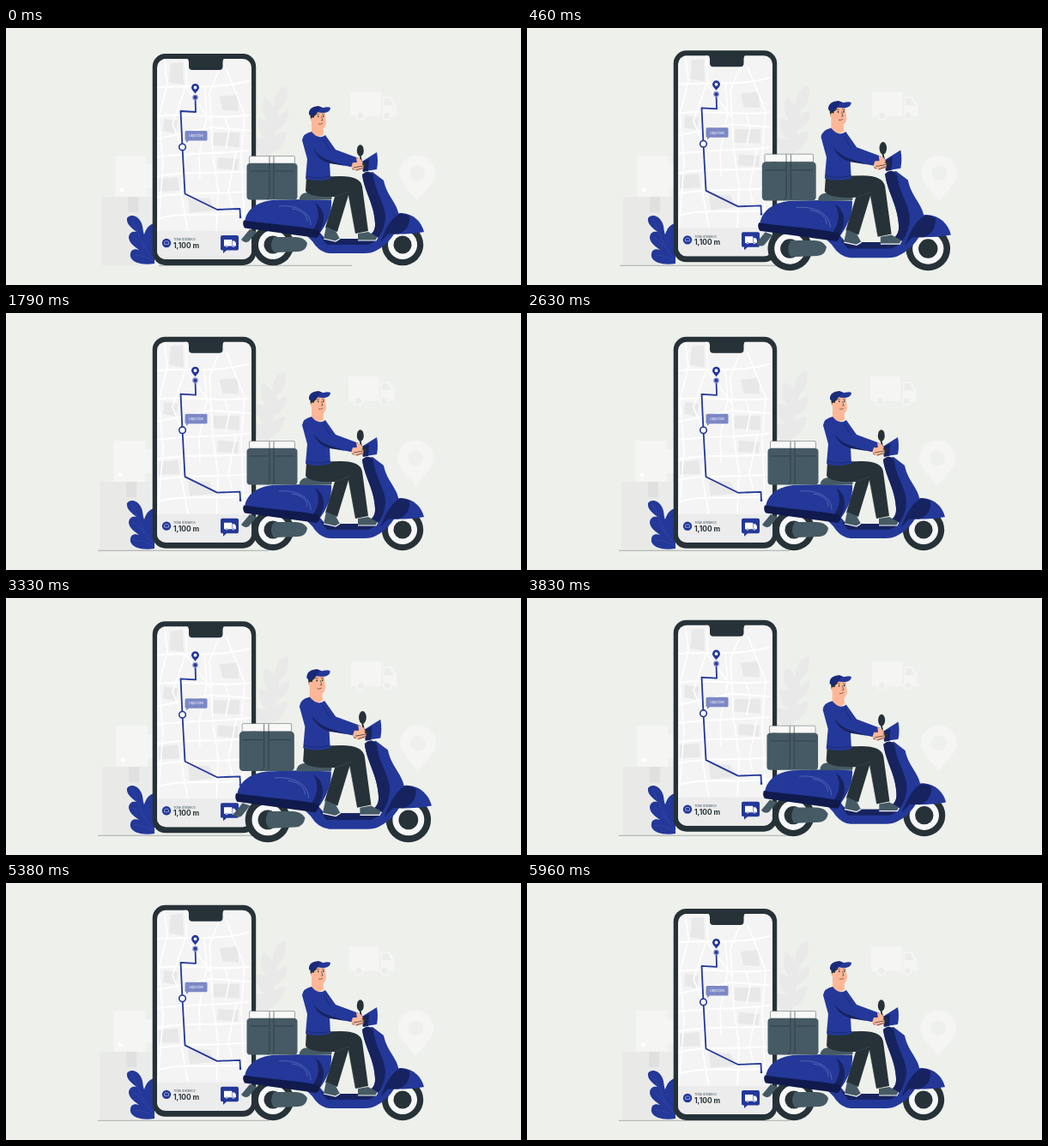
Write an HTML page that moves like this. It is 600 by 300 pixels and loops after 6000 ms.

```html
<!DOCTYPE html>
<html lang="en">
<head>
<meta charset="utf-8">
<title>Delivery</title>
<style>
html, body { margin: 0; width: 100%; height: 100%; overflow: hidden; background: #eef0eb; }
svg { display: block; width: 100vw; height: 100vh; }
text { font-family: Inter, "Open Sans", sans-serif; }
.blue { fill: #233899; }
.navy { fill: #17235f; }
.dark { fill: #263238; }
.grey { fill: #455a64; }
.skin { fill: #fdb797; }
.pale { fill: #f5f5f4; }
.line { fill: none; stroke: #263238; stroke-width: .6; }
.route { fill: none; stroke: #233899; stroke-width: 1.8; stroke-linejoin: round; }
</style>
</head>
<body>
<svg viewBox="0 0 600 300">
  <defs>
    <clipPath id="screen"><rect x="176" y="36" width="110" height="234" rx="10"/></clipPath>
    <g id="wheel">
      <circle class="dark" r="24.200"/>
      <circle r="17" fill="#f7f7f7"/>
      <circle class="dark" r="10.500"/>
    </g>
    <path id="pin" d="M0 33C-4 25-21 13-21 0A21 21 0 0 1 21 0C21 13 4 25 0 33ZM0-9A9 9 0 0 0 0 9A9 9 0 0 0 0-9Z" fill-rule="evenodd"/>
    <g id="truck">
      <path d="M0 0H35.500V29H0ZM37.500 6H47L53.500 15V29H37.500Z"/>
      <circle cx="11.500" cy="28.500" r="5.500"/><circle cx="42" cy="28.500" r="5.500"/>
    </g>
  </defs>

  <g id="back">
    <path fill="#e9eae8" d="M111 197H170V277H111Z"/>
    <path class="pale" d="M127 149H164V197H127ZM164 159H172V187H164Z"/>
    <path fill="#dfe0df" d="M142 197H154V215H142Z"/>
    <path fill="#ebecea" d="M154 197H170V277H154Z"/>
    <circle cx="135" cy="189" r="2.500" fill="#fff"/>
    <path fill="#e8e9e8" d="M327 68C318 69 312 80 312 92C309 87 305 83 301 81C296 92 300 103 306 110C302 108 297 106 294 106C292 119 298 127 305 131L290 128C290 140 295 150 303 154L302 172H308L309 146C319 142 326 132 327 121C322 121 317 123 313 127L314 119C324 116 329 108 329 97C324 97 320 100 317 104L317 96C326 91 329 79 327 68Z"/>
    <use href="#truck" x="401" y="74" class="pale"/>
    <g fill="#ebede9">
      <path d="M440 82H446L451 90H440Z"/>
      <circle cx="412.500" cy="102.500" r="3.500"/><circle cx="443" cy="102.500" r="3.500"/>
    </g>
    <use href="#pin" class="pale" x="479" y="169.500"/>
  </g>

  <path id="ground" fill="none" stroke="#263238" stroke-opacity=".5" stroke-width=".7"/>

  <g class="blue">
    <path d="M141 222C144 217 153 218 157 226C160 231 159 236 161 241C163 234 167 229 173 228V275C161 277 148 275 145 267C144 259 149 257 155 259C149 255 143 250 143 244C144 238 148 237 152 238C146 233 140 229 141 222Z"/>
    <path d="M146 223C153 234 157 254 173 271M148 244C154 248 158 252 161 257M149 265C157 265 165 268 172 272" fill="none" stroke="#3c50a9" stroke-width=".5"/>
  </g>

  <g id="phone">
    <rect class="dark" x="170.700" y="30" width="120.500" height="247" rx="15"/>
    <g clip-path="url(#screen)">
      <path fill="#f4f4f4" d="M170 30H292V277H170Z"/>
      <g fill="#e8e8e8">
        <path d="M192 41L206 40L207 66L190 63Z"/>
        <path d="M249 80L270 78L271 97L252 96Z"/>
        <path d="M242 122L272 122L272 139L241 137Z"/>
        <path d="M184 106L200 108L198 123L183 120Z"/>
        <path d="M247 151L271 153L270 166L246 164Z"/>
        <path d="M212 198L237 199L243 213L214 216Z"/>
        <path d="M178 176L200 174L202 190L178 191Z"/>
      </g>
      <g fill="none" stroke="#fff" stroke-width="2">
        <path d="M172 70C205 65 244 74 290 60M172 104C205 97 249 108 290 101M172 130L239 116L290 120M172 151C209 145 248 148 290 142M172 174C210 166 241 171 290 167M172 198C207 190 245 195 290 190M172 224C207 212 245 222 290 215"/>
        <path d="M184 33L188 65L178 105L183 160L177 238M209 35L211 71L239 109L241 146L247 190L245 238M250 45L237 76L239 108M257 49L278 101L274 151L278 238M209 69L194 112L209 150L204 192L212 238M231 68L234 103L225 148L226 177M255 103L260 120L256 141M268 145L259 191L265 214" stroke-width="1.500"/>
      </g>
      <path fill="#ececec" d="M170 237H292V277H170Z"/>
    </g>
    <path class="dark" d="M209 34H256Q252.500 36 252.500 40V45Q252.500 49 248.500 49H217Q213 49 213 45V40Q213 36 209 34Z"/>
    <path class="route" d="M220.500 81L221 98L203.500 97L205.500 139L208.500 193.500L246 212L272.500 211L273 221"/>
    <circle class="blue" cx="273" cy="221" r="1.300"/>
    <use href="#pin" class="blue" transform="translate(220.500 69.500) scale(.215)"/>
    <circle cx="220.500" cy="81" r="3.300" fill="#8792ca"/>
    <circle class="blue" cx="220.500" cy="81" r="2"/>
    <circle cx="205.500" cy="139" r="3.800" fill="#fff" stroke="#233899" stroke-width="1.600"/>
    <path fill="#7c88c5" d="M210 120H233Q234.500 120 234.500 121.500V130Q234.500 131.500 233 131.500H213L210 134V131.500Q208.500 131.500 208.500 130V121.500Q208.500 120 210 120Z"/>
    <text x="221.500" y="127.200" font-size="3.800" fill="#fff" text-anchor="middle">Objective</text>
    <circle class="blue" cx="187" cy="251" r="5.200"/>
    <path d="M184.500 249.500V252.500H189.500V249.500M185 249H189" fill="none" stroke="#a9b3df" stroke-width=".8"/>
    <text x="195" y="248.500" font-size="3.900" fill="#455a64">Total distance</text>
    <text x="195" y="257" font-size="8.400" font-weight="700" fill="#263238">1,100 m</text>
    <path class="blue" d="M252 242H269Q271 242 271 244V257.500Q271 259.500 269 259.500H257L253 263V259.500Q250 259.500 250 257.500V244Q250 242 252 242Z"/>
    <use href="#truck" fill="#fff" transform="translate(254 247) scale(.26)"/>
    <g class="blue"><circle cx="257" cy="254.400" r=".7"/><circle cx="265" cy="254.400" r=".7"/></g>
  </g>

  <g id="rider">
    <path class="grey" d="M284 235L292 238L283 249Q278 252 274 247Z"/>
    <use href="#wheel" x="311" y="253"/>
    <use href="#wheel" x="462" y="253"/>

    <path class="blue" d="M278 227C280 211 293 203 310 201L345 200L379 201C380 216 373 229 366 239L372 246H412Q431 243 430 228C429 205 417 190 415 171L427 168L440 178C444 198 458 205 458 223C456 239 445 253 431 260Q426 263 418 263H377Q365 262 357 249L348 240Z"/>
    <path class="navy" d="M415 171Q422 164 428 172C430 192 442 205 442 221C441 238 432 250 422 253H374L366 243L372 246H412Q431 243 430 228C429 205 417 190 415 171Z"/>
    <path class="blue" d="M440 240C440 224 449 216 461 216C475 217 484 226 487 238C472 241 453 241 440 240Z"/>
    <path class="navy" d="M436 250C441 238 447 223 458 217Q465 216 470 220C471 231 465 238 457 240.500H445Z"/>
    <path class="navy" d="M360 204C371 211 373 224 366 237L358 235C365 225 366 214 360 204Z"/>
    <path fill="#101a4c" d="M277 224.500C305 229 337 230 365 236Q367 241 362 245L278 233.500Q275 229 277 224.500Z"/>
    <path d="M318 208C339 206 355 215 355 230M333 211C344 212 351 218 351 226" fill="none" stroke="#7180c5" stroke-width=".6"/>
    <path class="grey" d="M312 244H337Q347 244 351 251Q350 260 341 261L314 262Q302 262 302 253Q303 245 312 244Z"/>
    <path class="dark" d="M312 244Q302 245 302 253Q302 262 312 262Q306 254 312 244Z"/>
    <path class="grey" d="M342 198Q344 192 352 192L377 194Q381 196 379 200.500L342 201Z"/>

    <path d="M283.500 158V151Q283.500 149.500 285 149.500H335Q336.500 149.500 336.500 151V158Z" fill="#f8f8f7" stroke="#263238" stroke-width=".4"/>
    <rect class="grey" x="280.500" y="158" width="59" height="42.500" rx="4"/>
    <path class="line" d="M307 150V196Q306 199 304 200M312 150V199M284 167H306M313 167H336"/>

    <path class="dark" d="M350 174L390 173Q413 173 415 185L422 237L407 240L399 195L386 238L372 233L383 197Q353 198 349 190Z"/>
    <path d="M399 195L407 238M383 197Q391 194 400 191" fill="none" stroke="#47555c" stroke-width=".5"/>
    <path class="grey" d="M373 232L384 237L389 246L384 249L370 246Z"/>
    <path class="grey" d="M410 240L422 238L433 244L431 248H410Z"/>
    <path d="M370 246L384 249L389 246M410 248H431L433 244.500" fill="none" stroke="#f5f5f5" stroke-width="1.200"/>

    <path class="blue" d="M413 157L432 145Q434 155 432 165L419 167Z"/>
    <path class="navy" d="M413 157L423 153L422 167L416 168Z"/>
    <ellipse class="dark" cx="412.800" cy="143" rx="4" ry="6.800"/>
    <path d="M412.500 149L415 160M405 164L420 159" fill="none" stroke="#263238" stroke-width="1.800"/>
    <path d="M405 163.500L417 160" stroke="#263238" stroke-width="4" stroke-linecap="round"/>

    <path class="skin" d="M356 109H369L370 124Q363 131 356 122Z"/>
    <path class="skin" d="M355 98L371 96L373 111Q371 119 366 118Q359 117 356 109Z"/>
    <path class="dark" d="M354 99L363 96Q363 101 359 103V109L355 107Z"/>
    <circle class="skin" cx="357.500" cy="107" r="2.500"/>
    <path d="M353 101Q352 92 364 91L369 93L369 98Q362 97 357 103Z" fill="#1a2a7b"/>
    <path class="blue" d="M366 94Q375 91 378 93Q378 98 371 99Q365 99 363 98Z"/>
    <path class="dark" d="M363 103.300A.7 1 0 0 1 364.500 103.300A.7 1 0 0 1 363 103.300ZM369 103A.7 1 0 0 1 370.500 103A.7 1 0 0 1 369 103Z"/>
    <path d="M362 101L365 100.500M368 100.500L371 101M367.500 103L369 108L367 108M364 112Q367 113 369 111" fill="none" stroke="#263238" stroke-width=".6"/>

    <path class="blue" d="M356 121Q346 123 345 131L351 153L349 176Q362 180 378 176L377 157L406 163L411 152L384 142L372 125Q364 131 356 121Z"/>
    <path class="navy" d="M358 141Q365 151 378 155L396 161L377 158Q363 154 358 141Z"/>
    <path d="M350 173Q364 177 378 173M370 130L378 143" fill="none" stroke="#17235f" stroke-width=".6"/>
    <path class="skin" d="M404 157L413 157Q418 160 416 165L408 167L402 163Z"/>
    <path class="skin" d="M408 151L414 154L416 158L409 158Z"/>
    <path d="M405 163L416 161M408 166L417 163" fill="none" stroke="#263238" stroke-width=".7"/>
  </g>
</svg>
<script>
const part = id => document.getElementById(id);
const [back, ground, phone, rider] = ["back", "ground", "phone", "rider"].map(part);
const smooth = p => (1 - Math.cos(Math.PI * p)) / 2;
const beats = [[0, 0], [.1, .09], [.3, 0], [.4, 0], [.48, .09], [.59, 0], [1, 0]];

function pulse(p) {
  const i = beats.findIndex(b => b[0] > p);
  const [p0, s0] = beats[i - 1], [p1, s1] = beats[i];
  return 1 + s0 + (s1 - s0) * (p - p0) / (p1 - p0);
}

function lift(p) {
  return p < .5 ? smooth((2 * p) ** .7) : smooth(2 - 2 * p);
}

function draw(now) {
  const t = now % 6000, beat = t % 3000 / 3000;
  phone.setAttribute("transform", `translate(0 ${-4.5 * lift(t % 1500 / 1500)})`);
  rider.setAttribute("transform", `translate(382 184) scale(${pulse(beat)}) translate(-382 -184)`);
  back.setAttribute("transform", `translate(${1.6 * Math.sin(2 * Math.PI * (beat + .07)) - .45} 0)`);

  const k = smooth(Math.min(t / 500, 1));
  ground.setAttribute("d", `M${178 - 71 * k} 277.300H${403 - 97 * k}`);
}

const start = performance.now();
function loop() {
  draw(performance.now() - start);
  requestAnimationFrame(loop);
}
loop();
</script>
</body>
</html>
```
